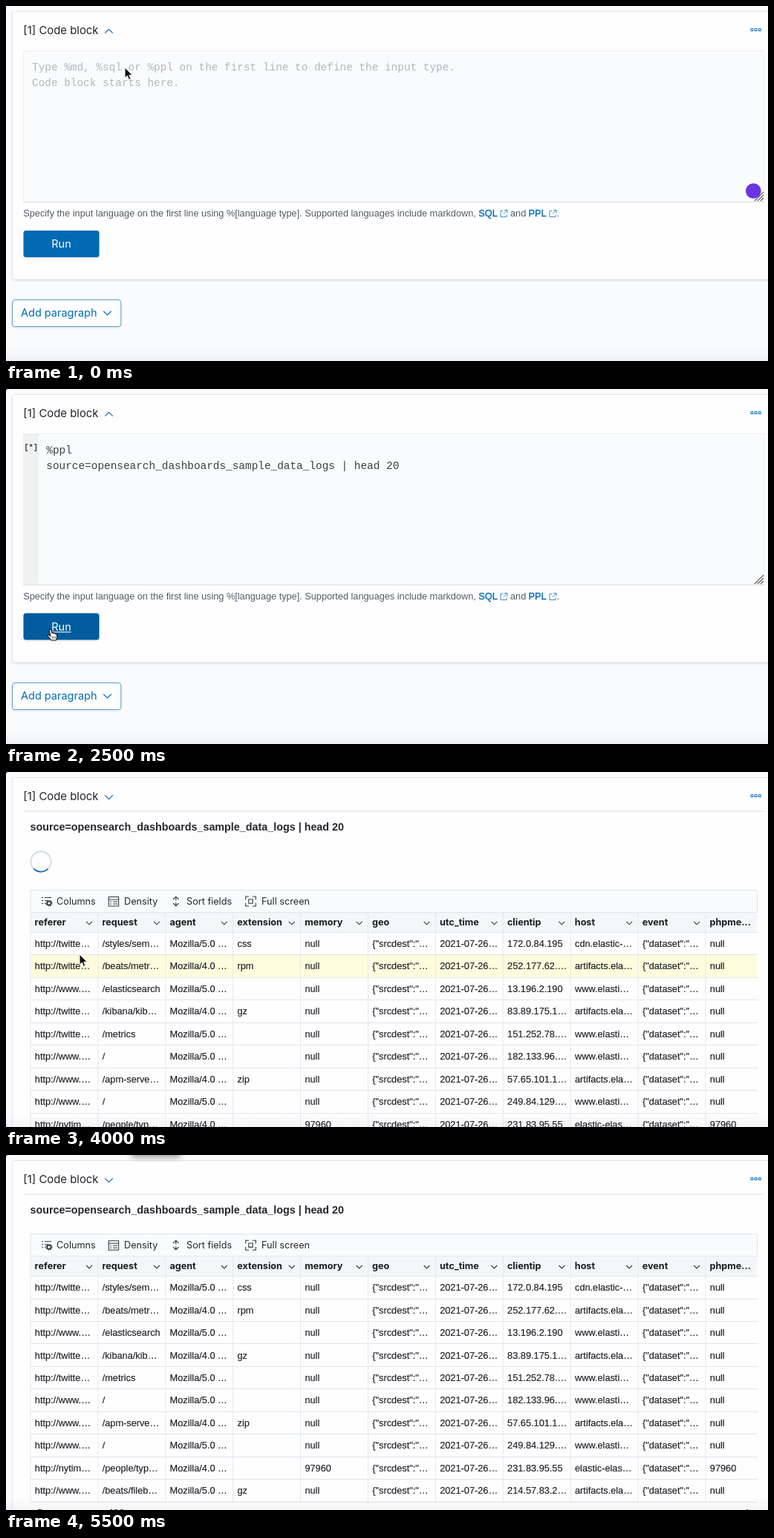
Animation of 1026 by 479 pixels, one loop 5.56 s. Source, as an HTML page:

```html
<!DOCTYPE html>
<html lang="en">
<head>
<meta charset="utf-8">
<title>Notebook code block</title>
<style>
html, body { margin: 0; width: 100%; height: 100%; overflow: hidden; background: #fafbfd; }
svg { display: block; width: 1026px; height: 479px; }
text { white-space: pre; fill: #343741; font-kerning: none; }
.ui { font: 14.5px Inter, sans-serif; }
.name { font: 14.9px Inter, sans-serif; fill: #22242b; }
.tool { font: 12.7px Inter, sans-serif; fill: #25272e; }
.head { font: 700 12.6px Inter, sans-serif; fill: #1a1c21; }
.cell { font: 12.75px "Liberation Sans", Arial, sans-serif; fill: #1d1f25; stroke: #1d1f25; stroke-width: .15; }
.title { font: 700 14.33px "Liberation Sans", Arial, sans-serif; fill: #25272e; }
.help { font: 12.73px "Liberation Sans", Arial, sans-serif; fill: #555b66; }
.code { font: 14.4px "Liberation Mono", "Courier New", monospace; fill: #3c3f47; }
.hint { fill: #b3b6bd; }
.link { fill: #006bb4; stroke: #006bb4; stroke-width: .35; }
.blue { fill: none; stroke: #1371b7; stroke-width: 1.3; }
.thin { fill: none; stroke: #2f82c0; stroke-width: .9; }
.dark { fill: none; stroke: #343741; stroke-width: 1.1; }
.rule { shape-rendering: crispEdges; }
</style>
</head>
<body>
<svg id="stage" viewBox="0 0 1026 479" xmlns="http://www.w3.org/2000/svg"></svg>
<script>
const LOOP = 5560;
const T = { dot: 30, beam: 100, focus: 230, paste: 1100, error: 1360, run: 2430,
  table: 3560, loaded: 4130, barOut: 4930, shade: 4930 };
const QUERY = 'source=opensearch_dashboards_sample_data_logs | head 20';

const text = (x, y, cls, s, extra = '') => `<text x="${x}" y="${y}" class="${cls}" ${extra}>${s}</text>`;
const rect = (x, y, w, h, fill, extra = '') =>
  `<rect x="${x}" y="${y}" width="${w}" height="${h}" fill="${fill}" ${extra}/>`;
const line = (x1, y1, x2, y2, color, w = 1, cls = '') =>
  `<path class="${cls}" d="M${x1} ${y1}L${x2} ${y2}" stroke="${color}" stroke-width="${w}"/>`;
const chevron = (x, y, w, h, cls) => `<path class="${cls}" d="M${x - w} ${y - h}L${x} ${y + h}L${x + w} ${y - h}"/>`;
const group = (id, body, extra = '') => `<g id="${id}" ${extra}>${body}</g>`;

const outLink = x => `<path class="thin" d="M${x + 4} 276.5h-3v8h8v-3M${x + 6} 275.5h4v4M${x + 10} 275.5l-5 5"/>`;

function editor() {
  const grip = [12, 8, 4].map(d => line(1020 - d, 263, 1020, 263 - d, '#555', 1.1)).join('');
  return rect(8.5, 7.5, 1040, 361.5, '#fefefe', 'rx="3" stroke="#dfe4ee" filter="url(#soft)"')
    + rect(23.5, 60.5, 997.5, 203.5, '#fafbfd', 'id="area" stroke="#eceff4"')
    + line(23, 264.5, 1021, 264.5, '#dde1e8')
    + group('gutter', rect(24, 61, 20, 203, '#f0f1f1')
      + text(24.2, 82, 'code', '[*]', 'style="font-size:10.5px;font-weight:700"'))
    + rect(23, 262, 998, 2.2, '#0d68a9', 'id="underline"')
    + group('hint', text(35, 87, 'code hint', 'Type %md, %sql or %ppl on the first line to define the input type.')
      + text(35, 108, 'code hint', 'Code block starts here.'))
    + group('typed', text(35, 87, 'code', '%ppl') + text(35, 108, 'code', QUERY))
    + rect(510.5, 96, 1, 16, '#444', 'id="caret"')
    + '<circle id="badge" cx="1006.3" cy="249.5" r="10.3" fill="#6a35e0"/>'
    + group('error', '<circle cx="1006.3" cy="249.5" r="6.5" fill="#ec5353"/>'
      + rect(1005.5, 245.5, 1.7, 5, '#fff') + rect(1005.5, 252, 1.7, 1.7, '#fff'))
    + grip
    + text(23.3, 283.6, 'help', 'Specify the input language on the first line using %[language type]. Supported languages include markdown,')
    + text(636.3, 283.6, 'help link', 'SQL') + outLink(665)
    + text(679, 283.6, 'help', 'and')
    + text(703.5, 283.6, 'help link', 'PPL') + outLink(731)
    + text(741.5, 283.6, 'help', '.')
    + group('run', rect(23.5, 303, 102, 36, '#006bb4', 'id="runBox" rx="3.5" filter="url(#soft)"')
      + text(74.5, 326.3, 'ui', 'Run', 'text-anchor="middle" style="fill:#fff"')
      + rect(61.5, 328, 26, 1.1, '#fff', 'id="runLine"'))
    + rect(8.5, 396.5, 146.3, 36, '#fefefe', 'rx="3.5" stroke="#5b9fce" filter="url(#soft)"')
    + text(20, 419.4, 'ui', 'Add paragraph', 'style="fill:#006bb4"')
    + chevron(136.5, 414.3, 5.3, 2.6, 'blue');
}

const COL = 90.9, ROW = 30.45, LEFT = 33, RIGHT = 1011.5, HEAD = 216.4, LIFT = 52.8;
const NAMES = 'referer request agent extension memory geo utc_time clientip host event phpme…'.split(' ');
const W = 'http://www.…', TW = 'http://twitte…';
const ART = 'artifacts.ela…', WEB = 'www.elasti…';
const ROWS = [
  [TW, '/styles/sem…', 5, 'css', '172.0.84.195', 'cdn.elastic-…'],
  [TW, '/beats/metr…', 4, 'rpm', '252.177.62.…', ART],
  [W, '/elasticsearch', 5, '', '13.196.2.190', WEB],
  [TW, '/kibana/kib…', 4, 'gz', '83.89.175.1…', ART],
  [TW, '/metrics', 5, '', '151.252.78.…', WEB],
  [W, '/', 5, '', '182.133.96.…', WEB],
  [W, '/apm-serve…', 4, 'zip', '57.65.101.1…', ART],
  [W, '/', 5, '', '249.84.129.…', WEB],
  ['http://nytim…', '/people/typ…', 4, '', '231.83.95.55', 'elastic-elas…', '97960'],
  [W, '/beats/fileb…', 5, 'gz', '214.57.83.2…', ART]
];

function toolbar() {
  const y = 174.5;
  return rect(LEFT, 159.5, RIGHT - LEFT, 30, '#fafbfd', 'stroke="#dfe5ef"')
    + `<path class="dark" d="M48 ${y - 5}h2M52 ${y - 5}h9M48 ${y - 1}h2M52 ${y - 1}h4M48 ${y + 3}h2M52 ${y + 3}h2"/>`
    + `<circle cx="58" cy="${y + 2.5}" r="2.6" class="dark" style="stroke-width:1.8"/><circle cx="58" cy="${y + 2.5}" r="4" class="dark" stroke-dasharray="1.6 1.54"/>`
    + text(68, 179, 'tool', 'Columns')
    + `<path class="dark" d="M138.2 ${y - 6}h13.4v12.5h-13.4zM138 ${y - 2.5}h13.5M140 ${y + .5}h2M144 ${y + .5}h6M140 ${y + 3.5}h2M144 ${y + 3.5}h6"/>`
    + text(159, 179, 'tool', 'Density')
    + `<path class="dark" d="M228.8 ${y - 6}v4.5M228.8 ${y + 6}v-4.5M225 ${y - 2.5}l3.8 -3.8l3.8 3.8M225 ${y + 2.5}l3.8 3.8l3.8 -3.8"/>`
    + text(243, 179, 'tool', 'Sort fields')
    + `<path class="dark" d="M327 ${y - 6.5}h-4.3v4.3M332 ${y - 6.5}h4.3v4.3M327 ${y + 6.5}h-4.3v-4.3M332 ${y + 6.5}h4.3v-4.3M326.8 ${y - 2.7}h5.4v5.4h-5.4z"/>`
    + text(344, 179, 'tool', 'Full screen');
}

function grid() {
  let s = toolbar() + rect(LEFT, 190, RIGHT - LEFT, HEAD - 190, '#f4f6fa');
  s += rect(LEFT, 0, RIGHT - LEFT, ROW, '#fffcdd', 'id="hover"');
  ROWS.forEach((r, i) => {
    const mem = r[6] || 'null', y = HEAD + ROW * i;
    const cells = [r[0], r[1], `Mozilla/${r[2]}.0 …`, r[3], mem, '{"srcdest":"…',
      '2021-07-26…', r[4], r[5], '{"dataset":"…', mem];
    s += cells.map((c, k) => text((LEFT + 5.8 + COL * k).toFixed(1), (y + 19.6).toFixed(2), 'cell', c)).join('');
    s += line(LEFT, y + ROW, RIGHT, y + ROW, '#dfe5ee', 1, 'rule');
  });
  const bottom = HEAD + ROW * ROWS.length;
  NAMES.forEach((n, k) => {
    const x = LEFT + COL * k;
    s += text(x + 5.6, 207.3, 'head', n);
    if (k < 10) s += chevron(x + 79, 203.8, 3.9, 2, 'dark');
    s += line(x, 190, x, bottom, '#e4e8f0');
  });
  return s + line(LEFT, HEAD, RIGHT, HEAD, '#dfe5ee', 1, 'rule')
    + text(42, 540.8, 'tool', 'Rows per page: 100')
    + chevron(938, 535, 3, 2, 'blue') + text(995, 540.8, 'tool', '1', 'style="fill:#006bb4"');
}

function results() {
  return rect(8.5, 7.5, 1040, 500, '#fefefe', 'rx="3" stroke="#dfe4ee"')
    + line(24, 53, 1021, 53, '#d6dde8')
    + text(32.5, 79, 'title', QUERY)
    + group('spinner', '<circle cx="47" cy="121" r="13.6" fill="none" stroke="#d0d7e3" stroke-width="1.6"/>'
      + '<path id="arc" d="M56.6 130.6A13.6 13.6 0 0 1 37.4 130.6" fill="none" stroke="#1573b8" stroke-width="1.8"/>')
    + group('grid', grid())
    + rect(34.5, 461, 470, 5.6, '#7f7f80', 'id="bar" rx="2.8"');
}

const pointers = group('arrow', '<path d="M0 0V14.2L3.3 11.2L5.5 16.4L8 15.3L5.8 10.3H10.2Z" fill="#111" stroke="#fff" stroke-width="1"/>')
  + group('beam', ['#fff', '#111'].map((c, i) =>
    `<path d="M-3.5 -7.5Q0 -7.5 0 -5Q0 -7.5 3.5 -7.5M0 -5V6M-3.5 8.5Q0 8.5 0 6Q0 8.5 3.5 8.5M-1.5 3.5H1.5" fill="none" stroke="${c}" stroke-width="${3 - 1.6 * i}"/>`).join(''))
  + group('hand', '<path d="M-1.2 1Q0 -1 1.4 1L2.6 5.2Q4 4 5 5.6Q6.6 4.8 7.2 6.4Q9 6 9.2 8V11Q8.8 13 8 14.8H1.4Q-.6 12 -3.4 9Q-3.6 7 -1.4 7.8L.4 9.2Z" fill="#fff" stroke="#111" stroke-width="1.1"/>'
    + '<path d="M3 9.5v3M5 9.5v3M7 9.5v3" stroke="#111" stroke-width=".7"/>');

document.getElementById('stage').innerHTML = `<defs>
  <filter id="soft" x="-5%" y="-10%" width="110%" height="130%"><feDropShadow dx="0" dy="1.4" stdDeviation="1.3" flood-color="#5f6f8c" flood-opacity=".18"/></filter>
  <filter id="blur" x="-50%" y="-100%" width="200%" height="300%"><feGaussianBlur stdDeviation="4.5"/></filter>
  <linearGradient id="fade" x2="0" y2="1"><stop stop-color="#55586a" stop-opacity="0"/><stop offset="1" stop-color="#55586a" stop-opacity=".06"/></linearGradient></defs>`
  + rect(0, 0, 1026, 479, '#fafbfd')
  + group('editor', editor()) + group('results', results())
  + text(23.3, 38.2, 'name', '[1] Code block')
  + group('fold', chevron(0, 0, 5.3, 2.6, 'blue'))
  + [1003, 1008.2, 1013.4].map(x => rect(x, 30.7, 2.8, 2.8, 'none', 'stroke="#1371b7" stroke-width="1"')).join('')
  + rect(0, 461, 1026, 18, 'url(#fade)')
  + rect(169, -20, 66, 23, '#222', 'id="shade" opacity=".45" filter="url(#blur)"')
  + rect(0, 0, 1.2, 1.2, '#000', 'id="dot"') + pointers;

const el = {};
document.querySelectorAll('#stage [id]').forEach(n => el[n.id] = n);
const show = (id, on) => { el[id].style.display = on ? '' : 'none'; };
const set = (id, k, v) => el[id].setAttribute(k, v);
const ramp = (t, a, b) => Math.min(1, Math.max(0, (t - a) / (b - a)));

// pointer stops: time, x, y
const STOPS = [[0, 160, 83], [1230, 160, 83], [1740, 54, 336], [2430, 54, 336], [2900, 142, 144],
  [3060, 142, 144], [3300, 99, 246], [4060, 99, 246], [4330, 197, 27], [4660, 199, 6], [4830, 201, -24]];

function pointerAt(t) {
  let i = 0;
  while (i < STOPS.length - 2 && t >= STOPS[i + 1][0]) i++;
  const [a, b] = [STOPS[i], STOPS[i + 1]];
  const p = ramp(t, a[0], b[0]), e = p * p * (3 - 2 * p);
  return [a[1] + (b[1] - a[1]) * e, a[2] + (b[2] - a[2]) * e];
}

function draw(t) {
  const [x, y] = pointerAt(t);
  const table = t >= T.table, loaded = t >= T.loaded;
  const focused = t >= T.focus && t < T.run, running = t >= T.run;
  const overArea = !table && y > 60 && y < 264 && t >= T.beam;
  const overRun = !table && x > 23 && x < 125 && y > 303 && y < 339;

  show('editor', !table);
  show('results', table);
  set('fold', 'transform', `translate(138.5 34) scale(1 ${table ? 1 : -1})`);

  set('area', 'fill', focused ? '#fefefe' : '#fafbfd');
  show('underline', focused);
  set('underline', 'width', 998 * ramp(t, T.focus, T.focus + 150));
  show('hint', t < T.paste);
  show('badge', t < T.paste);
  show('typed', t >= T.paste);
  show('caret', t >= T.paste && !running);
  show('error', t >= T.error && !running);
  show('gutter', running);
  set('typed', 'transform', `translate(${running ? 19.3 : 0} 0)`);
  set('run', 'transform', `translate(0 ${overRun ? -.6 : 0})`);
  set('runBox', 'fill', overRun ? '#005c9f' : '#006bb4');
  show('runLine', overRun);

  const lift = loaded ? LIFT : 0;
  show('spinner', !loaded);
  set('arc', 'transform', `rotate(${(t - 4000) * .6} 47 121)`);
  set('grid', 'transform', `translate(0 ${-lift})`);
  const row = Math.floor((y + 2 + lift - HEAD) / ROW);
  show('hover', row >= 0);
  set('hover', 'y', HEAD + ROW * row);
  show('bar', loaded);
  set('bar', 'opacity', 1 - ramp(t, T.barOut, T.barOut + 200));

  show('shade', t >= T.shade);
  show('dot', t >= T.dot);
  const kind = overArea ? 'beam' : overRun ? 'hand' : 'arrow';
  for (const id of ['arrow', 'beam', 'hand']) show(id, id === kind);
  set(kind, 'transform', `translate(${x.toFixed(2)} ${y.toFixed(2)})`);
}

const start = performance.now();
function tick() {
  draw((performance.now() - start) % LOOP);
  requestAnimationFrame(tick);
}
tick();
</script>
</body>
</html>
```
